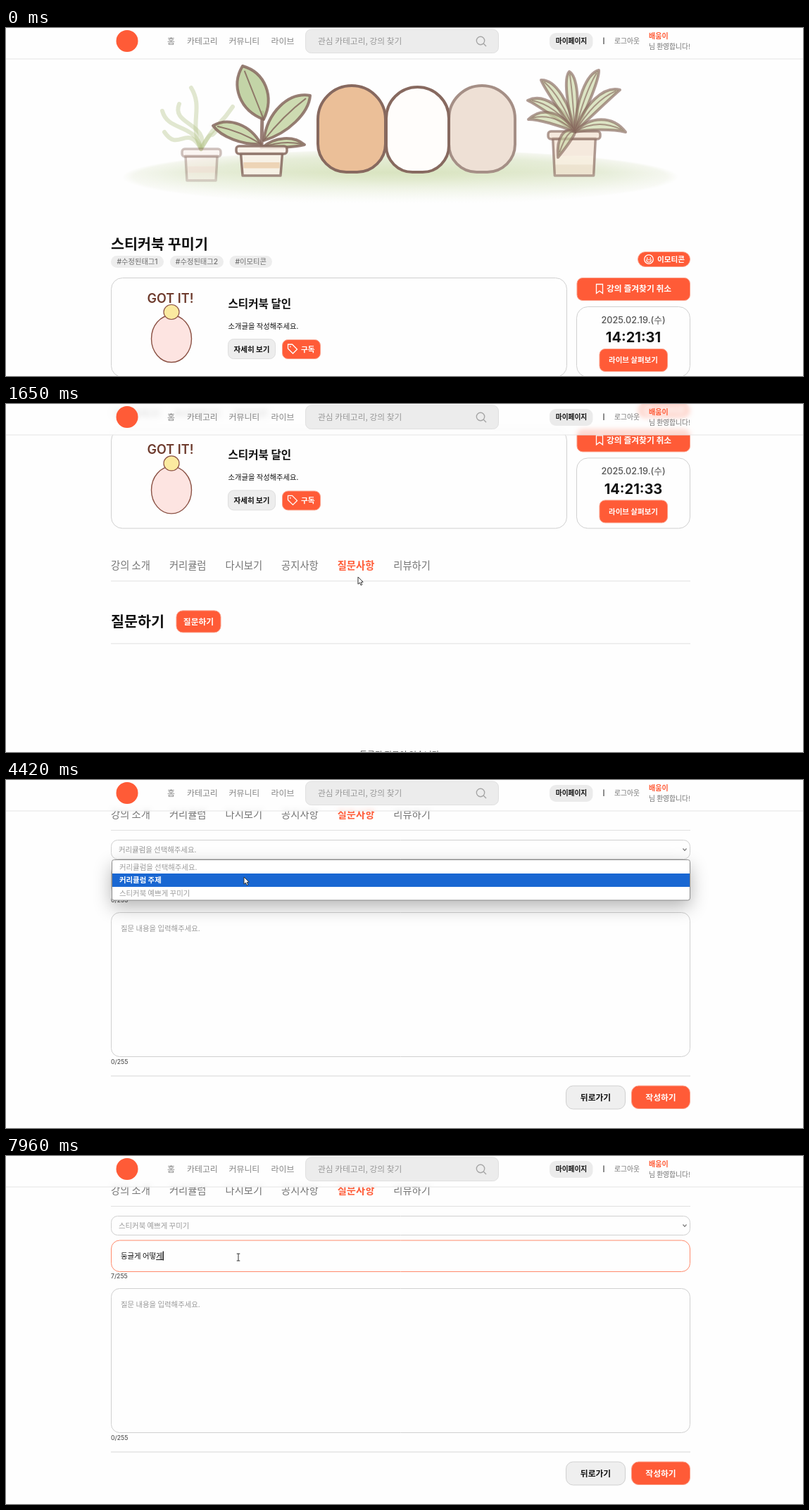
Animation of 1132x495 px, one loop 8000 ms. Source, as an HTML page with a canvas:

```html
<!DOCTYPE html>
<html lang="ko">
<head>
<meta charset="utf-8">
<title>강의</title>
<style>
html, body { margin: 0; width: 100%; height: 100%; overflow: hidden; background: #fefefe; }
canvas { display: block; }
</style>
</head>
<body>
<canvas id="stage" width="1132" height="495"></canvas>
<script>
const W = 1132, H = 495, LOOP = 8000, HEADER = 44;
const canvas = document.getElementById('stage');
const ctx = canvas.getContext('2d');
const KO = '"Noto Sans CJK KR", "Noto Sans CJK JP", "Noto Sans CJK", sans-serif';
const NUM = 'Inter, ' + KO;
const BG = '#fefefe', ORANGE = '#ff5b37', GREY = '#ededed', LINE = '#d0d0d0', BROWN = '#87695f';
const COURSE = '스티커북 꾸미기', LESSON = '스티커북 예쁘게 꾸미기';
const PICK = '커리큘럼을 선택해주세요.';
const TABS = ['강의 소개', '커리큘럼', '다시보기', '공지사항', '질문사항', '리뷰하기'];

// y is the visual middle of the line
function text(s, x, y, size, color, weight = 500, align = 'left', family = KO) {
  ctx.font = `${weight} ${size}px ${family}`;
  ctx.textAlign = align;
  ctx.fillStyle = color;
  ctx.fillText(s, x, y + size * 0.37);
}

function box(x, y, w, h, r, fill, stroke) {
  ctx.beginPath();
  ctx.roundRect(x, y, w, h, r);
  paint(fill, stroke, 1);
}

function button(x, y, w, h, r) {
  box(x + 0.5, y + 0.5, w - 1, h - 1, r, ORANGE, '#fb9c86');
}

function paint(fill, stroke, width) {
  if (fill) { ctx.fillStyle = fill; ctx.fill(); }
  if (stroke) { ctx.strokeStyle = stroke; ctx.lineWidth = width; ctx.stroke(); }
}

function rule(y, color = '#e0e0e0', x0 = 149, x1 = 972) {
  ctx.fillStyle = color;
  ctx.fillRect(x0, y, x1 - x0, 1);
}

function poly(points, fill, stroke, width, close = true) {
  ctx.beginPath();
  points.forEach(([x, y]) => ctx.lineTo(x, y));
  if (close) ctx.closePath();
  paint(fill, stroke, width);
}

function oval(x, y, rx, ry, fill, stroke, width) {
  ctx.beginPath();
  ctx.ellipse(x, y, rx, ry, 0, 0, Math.PI * 2);
  paint(fill, stroke, width);
}

// Eased interpolation over [time, ...values] rows
function track(rows, t) {
  if (t <= rows[0][0]) return rows[0].slice(1);
  for (let i = 1; i < rows.length; i++) {
    const a = rows[i - 1], b = rows[i];
    if (t < b[0]) {
      const k = (t - a[0]) / (b[0] - a[0]), e = k * k * (3 - 2 * k);
      return a.slice(1).map((v, j) => v + (b[j + 1] - v) * e);
    }
  }
  return rows[rows.length - 1].slice(1);
}

const SCROLL = [[340, 0], [750, 215], [1080, 304], [1580, 304], [1990, 500]];
const POINTER = [
  [470, 682, 250], [760, 682, 250], [1170, 514, 246], [1240, 514, 246], [1400, 504, 244],
  [1650, 500, 246], [2190, 281, 126], [2390, 281, 126], [2530, 282, 130], [2860, 314, 108],
  [3210, 314, 108], [3470, 374, 112], [3610, 374, 106], [3760, 372, 106], [4350, 338, 138],
  [4490, 338, 138], [4630, 338, 140], [4800, 330, 156], [5000, 326, 156], [5370, 301, 142],
  [5570, 301, 142], [5760, 330, 144]
];
const CLICKS = [1400, 2190, 3610, 4860, 5440];
const TYPED = [
  [6510, 'ㄷ'], [6620, '두'], [6730, '둥'], [6840, '둥ㄱ'], [6950, '둥그'], [7070, '둥글'],
  [7180, '둥긁'], [7290, '둥글게'], [7360, '둥글게 '], [7430, '둥글게 ㅇ'], [7500, '둥글게 어'],
  [7700, '둥글게 어ㄸ'], [7760, '둥글게 어떠'], [7820, '둥글게 어떻'], [7960, '둥글게 어떻게']
];

// lift arches the leaf upwards between base and tip
function leaf(x0, y0, x1, y1, w, fill, lift = 0) {
  const dx = x1 - x0, dy = y1 - y0, len = Math.hypot(dx, dy);
  const nx = -dy / len * w, ny = dx / len * w;
  const at = (k, s) => [x0 + dx * k + nx * s, y0 + dy * k + ny * s - lift];
  ctx.beginPath();
  ctx.moveTo(x0, y0);
  ctx.bezierCurveTo(...at(0.3, 0.7), ...at(0.75, 0.7), x1, y1);
  ctx.bezierCurveTo(...at(0.75, -0.7), ...at(0.3, -0.7), x0, y0);
  paint(fill, BROWN, 4);
  ctx.beginPath();
  ctx.moveTo(x0, y0);
  ctx.bezierCurveTo(...at(0.3, 0), ...at(0.6, 0), x0 + dx * 0.9, y0 + dy * 0.9 - lift * 0.3);
  paint(null, BROWN, 2);
}

function pot(x, y, w, h, fill, band) {
  const m = w * 0.09;
  poly([[x + m, y + 10], [x + w - m, y + 10], [x + w - m * 1.4, y + h], [x + m * 1.4, y + h]], fill, BROWN, 3.5);
  ctx.fillStyle = band;
  ctx.fillRect(x + m * 1.6, y + h * 0.55, w - m * 3.2, h * 0.2);
  ctx.beginPath();
  ctx.roundRect(x, y, w, 11, 4);
  paint(fill, BROWN, 3.5);
}

function egg(x, y, w, h, fill, stroke, width) {
  ctx.beginPath();
  ctx.roundRect(x, y, w, h, [w * 0.5, w * 0.5, w * 0.42, w * 0.42]);
  paint(fill, stroke, width);
}

function hero() {
  ctx.save();
  ctx.lineJoin = ctx.lineCap = 'round';
  ctx.save();
  ctx.translate(560, 212);
  ctx.scale(1, 0.1);
  const grass = ctx.createRadialGradient(0, 0, 60, 0, 0, 395);
  grass.addColorStop(0, '#d9e4c0');
  grass.addColorStop(0.7, '#e6edd8');
  grass.addColorStop(0.95, '#f4f6ee');
  grass.addColorStop(1, BG);
  oval(0, 0, 395, 395, grass);
  ctx.restore();

  ctx.globalAlpha = 0.4;
  for (const [x, y, bend] of [[263, 85, -18], [222, 118, -8], [322, 112, 20], [225, 148, -20], [305, 138, 22], [246, 108, 12]]) {
    ctx.beginPath();
    ctx.moveTo(277, 172);
    ctx.bezierCurveTo(277 + bend, 135, x - bend, y + 30, x, y);
    paint(null, '#b3c28a', 6);
  }
  pot(250, 172, 55, 45, '#f6e6de', '#eed6cc');
  ctx.globalAlpha = 0.85;
  poly([[363, 170], [364, 120]], null, BROWN, 5, false);
  leaf(364, 170, 424, 166, 12, '#c5d5a4', 6);
  leaf(362, 165, 294, 139, 22, '#c5d5a4', 5);
  leaf(366, 160, 432, 96, 30, '#c5d5a4', 6);
  leaf(366, 130, 336, 54, 38, '#b9cd98');
  pot(327, 168, 72, 42, '#fbf3e9', '#eccfae');
  ctx.globalAlpha = 0.65;
  pot(770, 147, 74, 63, '#f2dfcc', '#fbf4e6');
  for (const [x, y] of [[741, 103], [760, 74], [800, 62], [842, 60], [872, 88], [880, 148], [742, 130], [784, 184]])
    leaf(808, 148, x, y, 14, '#cbd8a7', 14);
  ctx.globalAlpha = 1;
  egg(443, 82, 96, 123, '#ebbf98', BROWN, 4);
  egg(629, 82, 94, 123, '#eee0d5', '#a58f86', 4);
  egg(540, 84, 89, 121, '#fffdfb', BROWN, 4);
  const fade = ctx.createLinearGradient(0, 205, 0, 250);
  fade.addColorStop(0, 'rgba(254,254,254,0)');
  fade.addColorStop(1, BG);
  ctx.fillStyle = fade;
  ctx.fillRect(140, 205, 840, 46);
  ctx.restore();
}

function bookmark(x, y) {
  poly([[x, y], [x + 9, y], [x + 9, y + 13], [x + 4.5, y + 9.5], [x, y + 13]], null, '#fff', 1.3);
}

function tagIcon(x, y) {
  poly([[x, y], [x + 6, y], [x + 13, y + 7], [x + 7, y + 13], [x, y + 6]], null, '#fff', 1.3);
  oval(x + 3.3, y + 3.3, 0.9, 0.9, '#fff');
}

function smiley(x, y) {
  oval(x, y, 6.3, 6.3, null, '#fff', 1.3);
  oval(x - 2.3, y - 1.6, 0.9, 1.1, '#fff');
  oval(x + 2.3, y - 1.6, 0.9, 1.1, '#fff');
  ctx.beginPath();
  ctx.arc(x, y + 0.8, 3.3, 0, Math.PI);
  ctx.closePath();
  paint(null, '#fff', 1.1);
}

function courseCard(t) {
  text(COURSE, 149, 307, 20.7, '#111', 700);
  [['#수정된태그1', 149, 75], ['#수정된태그2', 233, 76], ['#이모티콘', 317.5, 60.5]].forEach(([s, x, w]) => {
    box(x, 324, w, 17, 8.5, GREY);
    text(s, x + w / 2, 332.5, 10.3, '#707070', 500, 'center', NUM);
  });
  button(897, 318, 75, 22, 11);
  smiley(913, 329);
  text('이모티콘', 925, 329, 10.6, '#fff', 700);

  box(149.5, 355.5, 647, 141, 16, BG, LINE);
  text('GOT IT!', 233.5, 384, 18, '#6d3a2c', 600, 'center', 'Inter, sans-serif');
  oval(235, 442, 28.5, 33.5, '#fde4e1', '#8b5245', 1.4);
  oval(235, 404, 11, 10.5, '#fbeaa0', '#8b5245', 1.2);
  text('스티커북 달인', 315.5, 392, 15.6, '#111', 700);
  text('소개글을 작성해주세요.', 315.5, 424, 10.3, '#111');
  box(315.5, 442.5, 67, 28, 8, GREY, '#dedede');
  text('자세히 보기', 349, 457, 10.6, '#111', 600, 'center');
  button(392, 443, 55, 28, 8);
  tagIcon(400.5, 450);
  text('구독', 419, 457, 10.7, '#fff', 700);

  button(810.5, 355, 161.5, 33, 8);
  bookmark(838.5, 364.5);
  text('강의 즐겨찾기 취소', 853, 371, 11.8, '#fff', 700);
  box(810.5, 396.5, 161, 100, 16, BG, LINE);
  text('2025.02.19.(수)', 891, 415, 12.7, '#555', 500, 'center', NUM);
  const seconds = 31 + Math.floor((t + 810) / 1000);
  text('14:21:' + seconds, 891, 440, 20, '#111', 700, 'center', NUM);
  button(842.5, 456, 97.5, 33, 8);
  text('라이브 살펴보기', 891, 472.5, 10.5, '#fff', 700, 'center');
}

function tabs(active) {
  TABS.forEach((s, i) => {
    const on = i === active;
    text(s, i ? 152.3 + i * 79.6 : 149, 549, 14.3, on ? ORANGE : '#757575', on ? 700 : 500);
  });
  rule(571);
}

function intro() {
  text('강의 소개', 149, 629, 20.7, '#111', 700);
  text(LESSON, 149, 662, 11.7, '#111');
}

function questions() {
  text('질문하기', 149, 629, 20.7, '#111', 700);
  button(241.5, 613, 64, 32, 9);
  text('질문하기', 273.5, 629, 11.8, '#fff', 700, 'center');
  rule(660);
  text('등록된 질문이 없습니다.', 560.5, 818, 11.75, '#555', 500, 'center');
}

function form(t) {
  const row = TYPED.filter(r => t >= r[0]).pop();
  const typed = row ? row[1] : '';
  const focus = t >= 5500;
  box(149.5, 85.5, 822, 27, 9, BG, LINE);
  text(t >= 4930 ? LESSON : PICK, 160, 99, 10.4, '#999');
  poly([[961.5, 97.5], [964, 100.3], [966.5, 97.5]], null, '#777', 1.2, false);

  box(149.5, 120, 822, 44.5, 12, BG, focus ? '#ff8a6c' : LINE);
  if (typed) {
    text(typed, 163, 142, 10.4, '#111');
    const end = 163 + ctx.measureText(typed).width;
    const last = typed.slice(-1);
    if (last !== ' ') {
      const w = ctx.measureText(last).width;
      ctx.fillRect(end - w, 147, w, 1);
    }
    ctx.fillRect(end, 135.5, 1.3, 13);
  } else {
    text('질문 제목을 입력해주세요.', 163, 142, 10.4, '#999');
    if (focus && t < 6090) {
      ctx.fillStyle = '#111';
      ctx.fillRect(163, 135, 1.3, 13);
    }
  }
  text(typed.length + '/255', 149, 171, 8.6, '#555', 500, 'left', NUM);

  box(149.5, 188.5, 822, 205, 12, BG, LINE);
  text('질문 내용을 입력해주세요.', 163, 211, 10.4, '#999');
  text('0/255', 149, 400.5, 8.6, '#555', 500, 'left', NUM);
  rule(420.5, '#d8d8d8');
  box(795.5, 435, 84, 33, 10, '#efefef', LINE);
  text('뒤로가기', 837.5, 451.5, 11.8, '#111', 600, 'center');
  button(888, 434.5, 84, 33.5, 10);
  text('작성하기', 930, 451.5, 11.8, '#fff', 700, 'center');
}

function dropdown(hover) {
  ctx.save();
  ctx.shadowColor = 'rgba(0,0,0,.3)';
  ctx.shadowBlur = 26;
  ctx.shadowOffsetY = 9;
  box(150, 113.5, 821.5, 57.5, 3, '#fff');
  ctx.restore();
  box(150.5, 113.5, 821, 57.5, 3, '#fff', '#8a8a8a');
  [PICK, '커리큘럼 주제', LESSON].forEach((s, i) => {
    const on = i === hover;
    if (on) {
      ctx.fillStyle = '#1967d2';
      ctx.fillRect(151, 114 + 19 * i, 820, 19);
    }
    text(s, 161, 123.7 + 18.8 * i, 10.4, on ? '#fff' : '#9c9c9c', on ? 700 : 500);
  });
}

function header() {
  ctx.save();
  ctx.beginPath();
  ctx.rect(0, 0, W, HEADER);
  ctx.clip();
  ctx.filter = 'blur(3px)';
  ctx.drawImage(canvas, 0, 0);
  ctx.filter = 'none';
  ctx.fillStyle = 'rgba(254,254,254,.77)';
  ctx.fillRect(0, 0, W, HEADER);
  ctx.restore();
  rule(43.5, '#e6e6e6', 0, W);

  oval(172, 18.5, 15.5, 15.5, ORANGE);
  [['홈', 229], ['카테고리', 257], ['커뮤니티', 316.5], ['라이브', 376.5]].forEach(([s, x]) => text(s, x, 19, 11.9, '#858585'));
  box(425.5, 2, 274, 33.5, 8, '#ececec', '#e0e0e0');
  text('관심 카테고리, 강의 찾기', 443, 19, 11.75, '#999');
  oval(674, 18, 5.7, 5.7, null, '#a6a6a6', 1.4);
  poly([[678, 22], [682, 26]], null, '#a6a6a6', 1.4, false);
  box(772, 7, 61.5, 24, 9, '#ebebeb');
  text('마이페이지', 803, 18.7, 9.7, '#111', 600, 'center');
  ctx.fillStyle = '#444';
  ctx.fillRect(848.4, 13.5, 1.2, 9.5);
  text('로그아웃', 864, 18.7, 9.8, '#707070');
  text('배움이', 913, 11.3, 10, ORANGE, 700);
  text('님 환영합니다!', 913, 26.5, 9.75, '#707070');
}

function arrow() {
  poly([[0, 0], [0, 10.2], [2.4, 8.1], [4.1, 11.8], [5.8, 11], [4.2, 7.4], [7.2, 7.2]], '#fff', '#333', 1);
}

function hand() {
  poly([[-1, 0], [0.8, 0], [1.2, 4], [7, 5.2], [8.3, 6.6], [7.3, 12.5], [1, 12.5], [-3, 7.5], [-1.8, 6.4], [-0.8, 7.4]], '#fff', '#4a3a30', 1);
}

function ibeam() {
  poly([[-2.3, -5], [2.3, -5]], null, '#444', 1.1, false);
  poly([[0, -5], [0, 5]], null, '#444', 1.1, false);
  poly([[-2.3, 5], [2.3, 5]], null, '#444', 1.1, false);
}

function pointer(t) {
  if (t < 470) return;
  const [x, y] = track(POINTER, t);
  const beam = (t >= 2330 && t < 2660) || t >= 5200;
  const finger = (t >= 1350 && t < 1580) || (t >= 2060 && t < 2330);
  if (CLICKS.some(c => t >= c && t < c + 190))
    oval(x - 1, y - (beam ? 1 : 2), 9.5, 9.5, 'rgba(255,234,0,.55)');
  ctx.save();
  ctx.translate(x, y);
  ctx.lineJoin = 'round';
  (beam ? ibeam : finger ? hand : arrow)();
  ctx.restore();
}

function draw(t) {
  const [scroll] = track(SCROLL, t);
  const asking = t >= 1500, writing = t >= 2330;
  ctx.fillStyle = BG;
  ctx.fillRect(0, 0, W, H);
  ctx.save();
  ctx.translate(0, -scroll);
  if (scroll < 260) hero();
  courseCard(t);
  tabs(asking ? 4 : 0);
  if (!asking) intro();
  else if (!writing) questions();
  ctx.restore();
  header();
  if (writing) form(t);
  if (t >= 3680 && t < 4930) dropdown(t < 4100 ? 0 : t < 4700 ? 1 : 2);
  pointer(t);
}

const start = performance.now();
function frame() {
  draw((performance.now() - start) % LOOP);
  requestAnimationFrame(frame);
}
frame();
</script>
</body>
</html>
```
